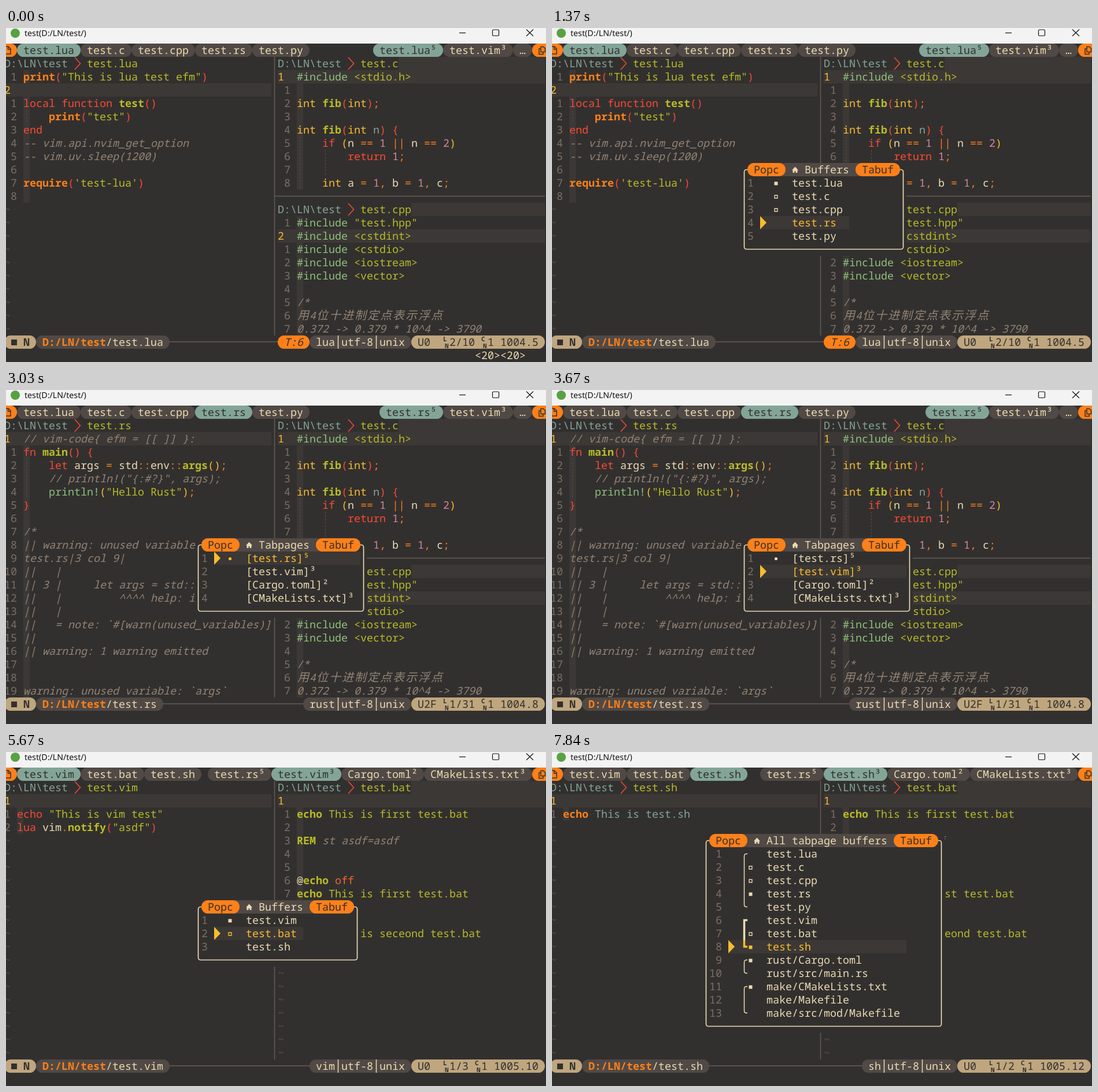
Write an HTML page that moves like this. It is 934 by 579 pixels and loops after 8000 ms.

```html
<!DOCTYPE html>
<html lang="en">
<head>
<meta charset="utf-8">
<title>Editor buffers</title>
<style>
html, body { margin: 0; width: 100%; height: 100%; overflow: hidden; background: #32302f; }
svg { display: block; width: 934px; height: 579px; }
text { font: 18.333px 'Noto Sans Mono', 'DejaVu Sans Mono', monospace; white-space: pre; text-rendering: geometricPrecision; }
.bold { font-weight: 700; }
.slant { font-style: italic; }
.cjk { font-family: 'Noto Sans CJK SC', 'Noto Sans CJK', sans-serif; font-size: 20px; }
.tiny { font-size: 11px; font-weight: 600; }
.title { font: 14.2px 'Noto Sans', 'Open Sans', sans-serif; }
</style>
</head>
<body>
<svg id="stage" viewBox="0 0 934 579"></svg>
<script>
const BG = '#32302f', LINE = '#3c3836', BAR = '#504945', RULE = '#665c54';
const FG = '#ebdbb2', ORANGE = '#fe8019', YELLOW = '#fabd2f', BLUE = '#83a598', TAN = '#bfa67e';
// Colour keys of the § markup; a capital letter makes the run bold.
const INK = { r: '#fb4934', o: ORANGE, y: YELLOW, g: '#b8bb26', b: BLUE, a: '#8ec07c', p: '#d3869b',
  f: FG, c: '#928374', n: '#7c6f64', e: '#5a524c', d: BG, i: BG, h: '#f0682f' };

const W = 11, H = 23, COLS = 85;
const X = col => col * W - 3;
const Y = row => 27 + row * H;
const mid = row => Y(row) + H / 2;
const esc = s => s.replace(/&/g, '&amp;').replace(/</g, '&lt;');

const rect = (x, y, w, h, fill, more = '') =>
  `<rect x="${x}" y="${y}" width="${w}" height="${h}" fill="${fill}" ${more}/>`;
const cells = (col, row, w, h, fill) => rect(X(col), Y(row), w * W, h * H, fill);
const pill = (col, row, w, fill) => rect(X(col), Y(row), w * W, H, fill, 'rx="11" ry="11.5"');
const stroke = (d, color, width = 1.5, more = '') =>
  `<path d="${d}" fill="none" stroke="${color}" stroke-width="${width}" ${more}/>`;

function put(col, row, str, key = 'f') {
  const low = key.toLowerCase();
  const style = (key !== low ? 'bold ' : '') + ('ci'.includes(low) ? 'slant ' : '');
  let out = '';
  for (const part of str.split(/([\u4e00-\u9fff])/)) {
    if (!part) continue;
    const wide = /[\u4e00-\u9fff]/.test(part);
    if (part.trim()) out += `<text class="${style}${wide ? 'cjk' : ''}" x="${X(col) + (wide ? 1 : 0)}" y="${Y(row) + 18}" fill="${INK[low]}">${esc(part)}</text>`;
    col += wide ? 2 : part.length;
  }
  return out;
}

function rich(col, row, str) {
  let out = '';
  for (const part of str.split('§').slice(1)) {
    out += put(col, row, part.slice(1), part[0]);
    col += part.length - 1;
  }
  return out;
}

const luaCode = [
  '§Oprint§r(§g"This is lua test efm"§r)', '', '§rlocal function §Gtest§r()',
  '§n┊   §Oprint§r(§g"test"§r)', '§rend', '§c-- vim.api.nvim_get_option',
  '§c-- vim.uv.sleep(1200)', '', "§Orequire§r(§g'test-lua'§r)", ''];
const rustCode = [
  '§c// vim-code{ efm = [[ ]] }:', '§rfn §Gmain§r() {',
  '§n┊   §rlet §fargs §o= §fstd§o::§fenv§o::§Gargs§y()§o;',
  '§n┊   §c// println!("{:#?}", args);', '§n┊   §aprintln!§y(§g"Hello Rust"§y)§o;', '§r}', '',
  '§c/*', '§c|| warning: unused variable', '§ctest.rs|3 col 9|', '§c||   |',
  '§c|| 3 |     let args = std::', '§c||   |         ^^^^ help: i', '§c||   |',
  '§c||   = note: `#[warn(unused_variables)]', '§c||', '§c|| warning: 1 warning emitted',
  '', '', '§cwarning: unused variable: `args`'];
const cCode = [
  '§a#include §g<stdio.h>', '', '§yint §Gfib§r(§yint§r)§o;', '',
  '§yint §Gfib§r(§yint §bn§r) {', '§n┊   §rif §y(§fn §o== §p1 §o|| §fn §o== §p2§y)',
  '§n┊   ┊   §rreturn §p1§o;', '§n┊   ┊',
  '§n┊   §yint §fa §o= §p1§o, §fb §o= §p1§o, §fc§o;'];
const cppCode = [
  ...['"test.hpp"', '<cstdint>', '<cstdio>', '<iostream>', '<vector>'].map(s => '§a#include §g' + s),
  '', '§c/*', '§c用4位十进制定点表示浮点', '§c0.372 -> 0.379 * 10^4 -> 3790'];
const vimCode = ['', '§recho §g"This is vim test"', '§rlua §fvim§o.§Gnotify§r(§g"asdf"§r)'];
const shCode = ['', '§Oecho §bThis is test.sh'];
const batCode = ['', '§Gecho§g This is first test.bat', '', '§GREM §cst asdf=asdf', '', '',
  '§f@§Gecho §hoff', '§Gecho§g This is first test.bat', '', '', '§Gecho§g This is seceond test.bat', '', ''];

function pane(col, top, width, bottom, file, code, cur = 0, gutter = 2) {
  const first = top + 1, textCol = col + gutter + 1, nameEnd = col + 13 + file.length;
  let out = '';
  if (col) out += cells(nameEnd, top, COLS - nameEnd, 1, LINE);
  out += put(col, top, 'D:\\LN\\test', 'b') + put(col + 13, top, file, 'g');
  out += stroke(`M${X(col + 11) + 1} ${Y(top) + 1} l9.5 10.5 l-9.5 10.5`, INK.r);
  out += cells(textCol, first, 1, code.length, LINE) + cells(col, first + cur, width, 1, LINE);
  code.forEach((line, i) => {
    const row = first + i;
    out += i === cur ? put(col, row, String(i + 1), 'y')
      : put(col, row, String(Math.abs(i - cur)).padStart(gutter), 'n');
    [...line.replace(/§./g, '')].forEach((ch, k) => {
      if (ch === '┊') out += stroke(`M${X(textCol + k) + 5.5} ${Y(row)} v${H}`, BAR, 1.3, 'stroke-dasharray="3.5 2.25"');
    });
    out += rich(textCol, row, line.replace(/┊/g, ' '));
  });
  for (let row = first + code.length; row <= bottom; row++) out += put(col, row, '~', 'e');
  return out;
}

const tabRow = (col, names, active) => names.map((name, i) => {
  const on = i === active, len = name.length + 2;
  const out = pill(col, 0, len, on ? BLUE : BAR) + put(col + 1, 0, name, on ? 'd' : 'f');
  col += len;
  return out;
}).join('');

function tabLine(ed) {
  const used = ed.tabs.reduce((n, s) => n + s.length + 2, 0);
  return pill(-3, 0, 5, ORANGE) + pill(83, 0, 5, ORANGE)
    + stroke('M-2 32 h6 l4 4 v9 h-10 M3.5 32 v5 h4.5', BG)
    + stroke('M925 32.5 h4.5 l3 3 v6 h-7.5 z M925 36 h-3 v9.5 h7 v-4', BG)
    + tabRow(2, ed.bufs, ed.buf) + tabRow(83 - used, ed.tabs, ed.tab);
}

function statusLine(ed) {
  const info = [ed.type, 'utf-8', 'unix'].join('|'), start = 64 - info.length - 2;
  const leftEnd = 5 + ed.file.length + 13;
  let out = stroke(`M${X(leftEnd - 1)} 544 H${X(start + 1)}`, RULE, 1.3);
  out += pill(0, 22, 5, TAN) + rect(9, 540, 10, 10, BG) + put(3, 22, 'N', 'D');
  out += pill(5, 22, leftEnd - 5, BAR) + put(6, 22, 'D:/LN/test', 'O') + put(16, 22, '/' + ed.file);
  if (ed.trail) out += pill(43, 22, 5, ORANGE) + put(44, 22, ed.trail, 'i');
  out += pill(start, 22, info.length + 2, BAR) + put(start + 1, 22, info.replace(/\|/g, ' '));
  out += pill(64, 22, 21, TAN) + put(65, 22, ed.pos.replace(/@/g, ' '), 'd');
  [...info].forEach((ch, i) => {
    if (ch === '|') out += stroke(`M${X(start + 1 + i) + 5.5} ${Y(22)} v${H}`, FG);
  });
  let top = 'L';
  [...ed.pos].forEach((ch, i) => {
    if (ch !== '@') return;
    const x = X(65 + i);
    out += `<text class="tiny" x="${x}" y="543" fill="${BG}">${top}</text><text class="tiny" x="${x + 3}" y="555" fill="${BG}">N</text>`;
    top = 'C';
  });
  return out;
}

function mark(kind, col, row, color) {
  const x = X(col) + 5.5, y = mid(row) + 1;
  if (kind === 'full') return rect(x - 3, y - 3, 6, 6, color);
  if (kind === 'open') return stroke(`M${x - 2.5} ${y - 2.5} h5 v5 h-5 z`, color, 1.3);
  if (kind === 'dot') return `<circle cx="${x}" cy="${y}" r="2.6" fill="${color}"/>`;
  return '';
}

function bracket(col, from, to, heavy) {
  const x = X(col) + 5.5, a = mid(from), b = mid(to);
  if (!heavy) return stroke(`M${x + 5.5} ${a} h-1.5 q-4 0 -4 4 V${b - 4} q0 4 4 4 h1.5`, FG);
  return stroke(`M${x + 5.5} ${a} H${x} V${Y(to)}`, FG, 3.5) + stroke(`M${x} ${Y(to)} V${b} H${x + 5.5}`, YELLOW, 3.5);
}

function popup({ title, col, row, items, sel, groups }) {
  const right = col + title.length + 18, last = row + items.length + 1;
  const digits = String(items.length).length, arrow = col + digits + 2;
  const markCol = arrow + (groups ? 3 : 2), textCol = markCol + 3;
  const wide = Math.max(...items.map(it => it[0].length)) + 1;
  const tabuf = right - 7, hx = X(col + 8), hy = mid(row);
  let out = cells(col, row, right - col + 1, last - row + 1, BG);
  out += rect(X(col) + 5.5, mid(row), (right - col) * W, (last - row) * H, 'none', `rx="4" stroke="${FG}" stroke-width="1.7"`);
  out += cells(col + 6, row, tabuf - col - 5, 1, BAR);
  out += pill(col + 1, row, 6, ORANGE) + put(col + 2, row, 'Popc', 'd');
  out += `<path d="M${hx} ${hy + 1} l5.5 -6 l5.5 6 h-1.5 v4.5 h-3 v-3 h-2 v3 h-3 v-4.5 z" fill="${FG}"/>`;
  out += put(col + 10, row, title) + pill(tabuf, row, 7, ORANGE) + put(tabuf + 1, row, 'Tabuf', 'd');
  items.forEach(([name, kind, tint], i) => {
    const r = row + 1 + i, on = i === sel;
    if (on) {
      out += cells(arrow, r, textCol + wide - arrow, 1, LINE);
      out += `<path d="M${X(arrow)} ${Y(r)} l${W} ${H / 2} l${-W} ${H / 2} z" fill="${YELLOW}"/>`;
    }
    out += put(col + 1, r, String(i + 1).padStart(digits), 'n');
    out += mark(kind, markCol, r, tint || (on ? YELLOW : FG)) + put(textCol, r, name, on ? 'y' : 'f');
  });
  for (const [a, b, heavy] of groups || []) out += bracket(markCol - 1, row + a, row + b, heavy);
  return out;
}

const codeBufs = ['test.lua', 'test.c', 'test.cpp', 'test.rs', 'test.py'];
const scriptBufs = ['test.vim', 'test.bat', 'test.sh'];
const moreTabs = ['Cargo.toml²', 'CMakeLists.txt³'];
const codeSide = () => pane(43, 1, 42, 10, 'test.c', cCode) + pane(43, 12, 42, 21, 'test.cpp', cppCode, 1)
  + stroke(`M464.5 ${mid(11)} H932`, RULE);
const batSide = () => pane(43, 1, 42, 21, 'test.bat', batCode);

const lua = { file: 'test.lua', code: luaCode, cur: 1, gutter: 2, side: codeSide, bufs: codeBufs, buf: 0,
  tabs: ['test.lua⁵', 'test.vim³', '…'], tab: 0, type: 'lua', trail: 'T:6', pos: 'U0  @2/10 @1 1004.5' };
const rust = { ...lua, file: 'test.rs', code: rustCode, cur: 0, buf: 3,
  tabs: ['test.rs⁵', 'test.vim³', '…'], type: 'rust', trail: '', pos: 'U2F @1/31 @1 1004.8' };
const vim = { file: 'test.vim', code: vimCode, cur: 0, gutter: 1, side: batSide, bufs: scriptBufs, buf: 0,
  tabs: ['test.rs⁵', 'test.vim³', ...moreTabs], tab: 1, type: 'vim', pos: 'U0  @1/3 @1 1005.10' };
const sh = { ...vim, file: 'test.sh', code: shCode, buf: 2,
  tabs: ['test.rs⁵', 'test.sh³', ...moreTabs], type: 'sh', pos: 'U0  @1/2 @1 1005.12' };

const list = (names, kinds) => names.map((name, i) => [name, kinds[i]]);
const buffers = (row, items, sel) => ({ title: 'Buffers', col: 30, row, items, sel });
const luaList = sel => buffers(9, list(codeBufs, ['full', 'open', 'open']), sel);
const rustList = () => {
  const items = list(codeBufs, ['', 'open', 'open', 'full']);
  items[3].push(INK.g);
  return buffers(9, items, 3);
};
const vimList = sel => buffers(10, list(scriptBufs, ['full', 'open']), sel);
const shList = () => buffers(10, list(scriptBufs, ['', 'open', 'full']), 2);
const tabList = (sel, current) => ({ title: 'Tabpages', col: 30, row: 10, sel,
  items: ['[test.rs]⁵', '[test.vim]³', '[Cargo.toml]²', '[CMakeLists.txt]³'].map((s, i) => [s, i === current ? 'dot' : '']) });
const allList = () => ({ title: 'All tabpage buffers', col: 24, row: 5, sel: 7,
  groups: [[1, 5], [6, 8, true], [9, 10], [11, 13]],
  items: list([...codeBufs, ...scriptBufs, 'rust/Cargo.toml', 'rust/src/main.rs',
    'make/CMakeLists.txt', 'make/Makefile', 'make/src/mod/Makefile'],
    ['', 'open', 'open', 'full', '', '', 'open', 'full', 'full', '', 'full']) });

const LOOP = 8000;
const steps = [
  [0, lua], [310, lua, luaList(0)], [1000, lua, luaList(1)], [1220, lua, luaList(2)], [1370, lua, luaList(3)],
  [2060, rust, rustList()], [3030, rust, tabList(0, 0)], [3670, rust, tabList(1, 0)],
  [4200, vim, tabList(1, 1)], [5670, vim, vimList(1)], [6260, vim, vimList(2)],
  [6870, sh, shList()], [7840, sh, allList()]];

const titleBar = rect(0, 0, 934, 27, '#f3f3f3') + '<circle cx="16" cy="9" r="8" fill="#57a143"/>'
  + '<text class="title" x="32" y="14" fill="#111">test(D:/LN/test/)</text>'
  + stroke('M784 8.5 h11', '#111', 1.2) + rect(841.5, 3, 11, 10.5, 'none', 'rx="1.5" stroke="#111" stroke-width="1.2"')
  + stroke('M900 2.5 l12 11.5 M912 2.5 l-12 11.5', '#111', 1.2);

function scene([, ed, pop]) {
  return rect(0, 0, 934, 579, BG) + titleBar + tabLine(ed)
    + pane(0, 1, 42, 21, ed.file, ed.code, ed.cur, ed.gutter) + ed.side()
    + stroke(`M464.5 ${Y(1)} V${Y(22)}`, RULE) + statusLine(ed)
    + (pop ? popup(pop) : put(74, 23, '<20><20>'));
}

const stage = document.getElementById('stage');
let shown = null;
function draw(now) {
  const t = now % LOOP;
  const step = steps.filter(s => s[0] <= t).pop();
  if (step !== shown) {
    stage.innerHTML = scene(step);
    shown = step;
  }
}
const begin = performance.now();
function tick() {
  draw(performance.now() - begin);
  requestAnimationFrame(tick);
}
tick();
</script>
</body>
</html>
```
